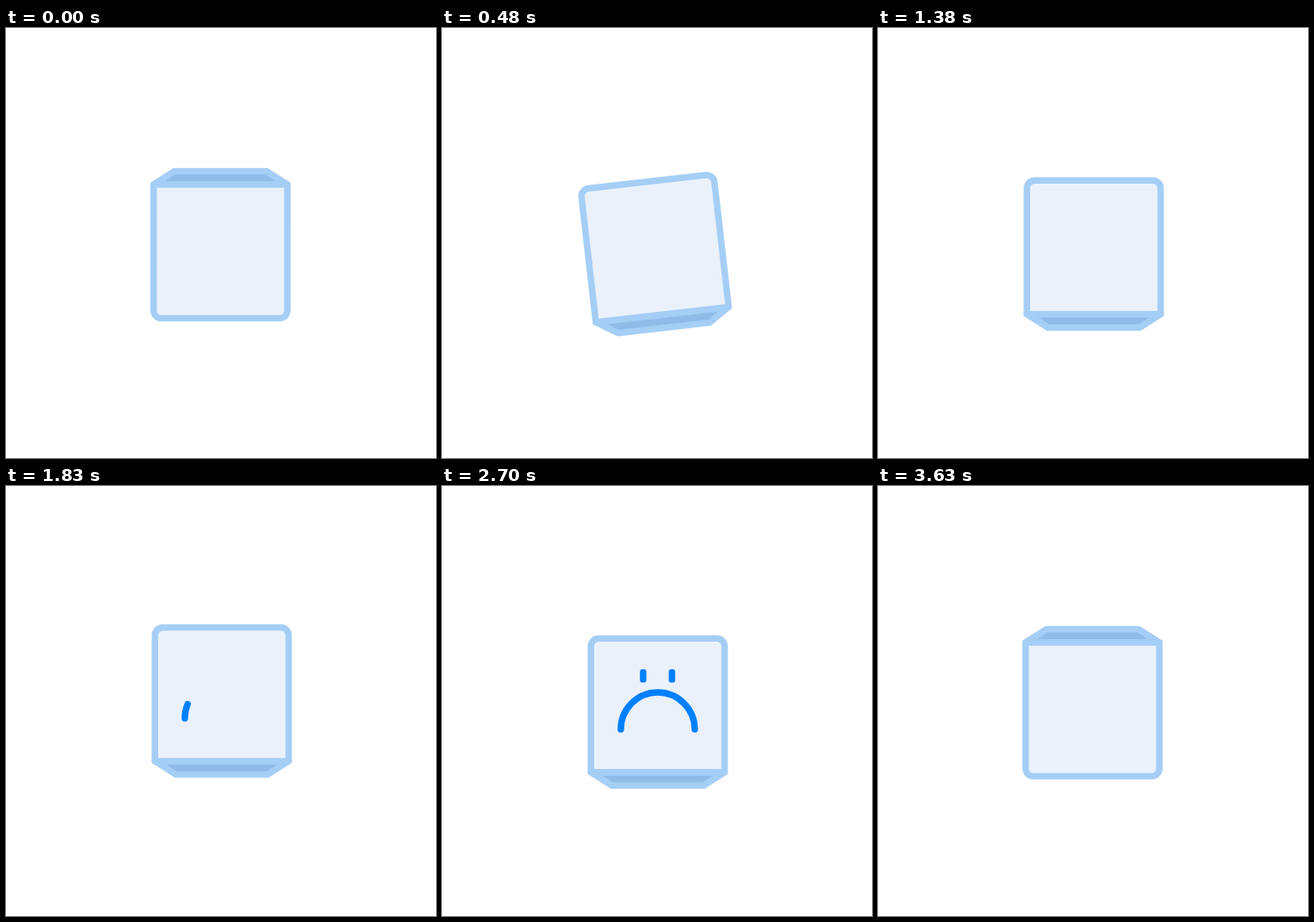
An HTML page for the animation above (4.53 s loop, 500 by 500 pixels).

```html
<!DOCTYPE html>
<html lang="en">
<head>
<meta charset="utf-8">
<title>Empty box</title>
<style>
  html, body { margin: 0; width: 100%; height: 100%; overflow: hidden; background: #fff; }
  svg { display: block; width: 100%; height: 100%; }
  .edge { stroke: #a5cef6; stroke-width: 7.5; stroke-linejoin: round; }
</style>
</head>
<body>
<svg viewBox="0 0 500 500">
  <g id="box">
    <path class="edge" fill="#90bbe8" d="M-77.75-77.75L-53.5-93.25H53.5L77.75-77.75Z"/>
    <path class="edge" fill="#eaf1fa" d="M-77.75-77.75H77.75V68.75a9 9 0 0 1-9 9H-68.75a9 9 0 0 1-9-9Z"/>
    <g id="face" fill="#0080ff">
      <g id="eyes">
        <rect x="-20.75" y="-7.75" width="7.5" height="15.5" rx="3.2"/>
        <rect x="12.75" y="-7.75" width="7.5" height="15.5" rx="3.2"/>
      </g>
      <path id="mouth" pathLength="1" d="M-43 28A43 43 0 0 1 43 28" fill="none"
        stroke="#0080ff" stroke-width="7.5" stroke-linecap="round"/>
    </g>
  </g>
</svg>
<script>
const LOOP = 4530;
const SHAKE_START = 490, SHAKE_PERIOD = 465;
const [box, face, eyes, mouth] = ['box', 'face', 'eyes', 'mouth'].map(id => document.getElementById(id));

// Eased step from 0 to 1 between two times.
function ramp(t, from, to) {
  const u = Math.min(Math.max((t - from) / (to - from), 0), 1);
  return u * u * (3 - 2 * u);
}

const bump = (t, from, peak, to) => ramp(t, from, peak) - ramp(t, peak, to);

// Height of the growing hops; the third one sinks back slowly.
function shake(t) {
  const hops = (t - SHAKE_START) / SHAKE_PERIOD;
  if (hops < 0) return 0;
  const height = Math.min(9.5 + 6 * hops, 18.5);
  const sink = Math.max(1 - (hops - 2.5) / 3, 0);
  return height * (hops < 2.5 ? Math.sin(Math.PI * hops) ** 2 : sink ** 2);
}

function show(element, visible) {
  element.setAttribute('visibility', visible ? 'visible' : 'hidden');
}

function draw(t) {
  const flip = ramp(t, 0, 543) - ramp(t, 3210, 3630);
  const x = 249.4 + 1.5 * flip - 46 * bump(t, 80, 350, 508) - 16.5 * bump(t, 3210, 3420, 3630);
  const y = 259.75 - 3.5 * flip - 28 * bump(t, 170, 355, 490) + 20 * bump(t, 3340, 3500, 3630) - shake(t);
  box.setAttribute('transform', `translate(${x} ${y}) rotate(${180 * flip})`);
  face.setAttribute('transform', `rotate(180) translate(0 ${12 * ramp(t, 3000, 3180)})`);

  const open = ramp(t, 1960, 2130) - ramp(t, 3000, 3130);
  eyes.setAttribute('transform', `translate(0 -34.25) scale(1 ${open})`);
  show(eyes, open > 0);

  const start = 0.4 * ramp(t, 3135, 3330);
  const end = ramp(t, 1740, 2150) - 0.6 * ramp(t, 3076, 3330);
  const length = Math.max(end - start, 0);
  mouth.setAttribute('stroke-dasharray', `${length} 2`);
  mouth.setAttribute('stroke-dashoffset', -start);
  show(mouth, length > 0.001);
}

const began = performance.now();
function tick() {
  draw((performance.now() - began) % LOOP);
  requestAnimationFrame(tick);
}
tick();
</script>
</body>
</html>
```
